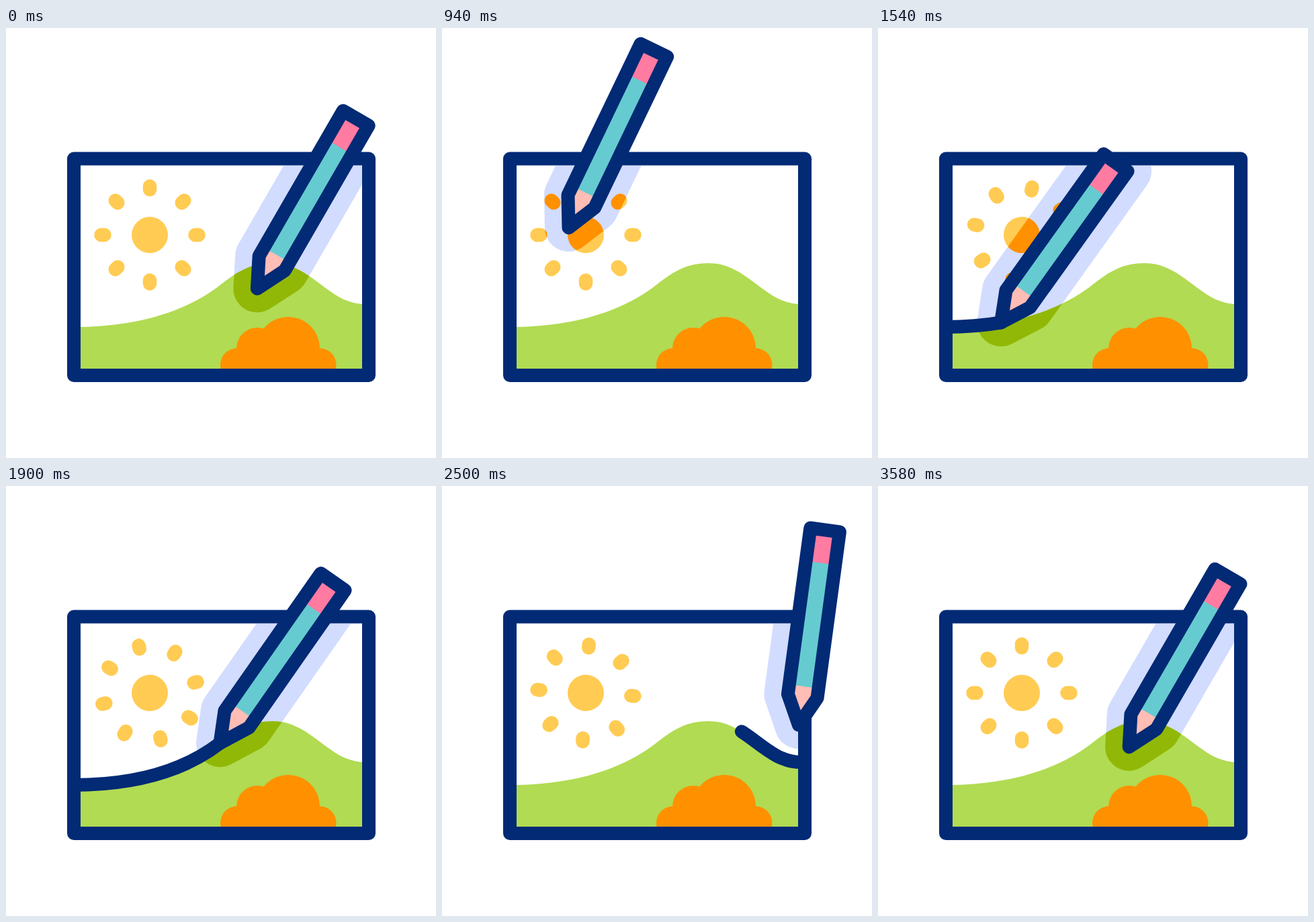
An HTML page that plays this animation: 640x640 px, repeating every 3.6 s.

```html
<!DOCTYPE html>
<html lang="en">
<head>
<meta charset="utf-8">
<title>Pencil drawing a landscape</title>
<style>
  html, body { margin: 0; height: 100%; overflow: hidden; background: #fff; }
  svg { display: block; width: 100vw; height: 100vh; }
</style>
</head>
<body>
<svg viewBox="0 0 640 640">
  <defs>
    <path id="ground"/>
    <g id="sun">
      <circle cx="214" cy="308" r="27" stroke="none"/>
      <path id="rays" stroke-width="20.5" stroke-linecap="round"/>
    </g>
    <path id="body" d="M0 0L-22 -43.5V-293H22V-43.5Z" stroke-linejoin="round"/>
    <clipPath id="inside"><path d="M111 205H530V507H111Z"/></clipPath>
    <mask id="halo" maskUnits="userSpaceOnUse" x="0" y="0" width="640" height="640">
      <use class="pencil" href="#body" fill="#fff" stroke="#fff" stroke-width="71"/>
    </mask>
  </defs>

  <g clip-path="url(#inside)">
    <use href="#ground" fill="#b1db52"/>
    <use href="#sun" fill="#ffcb52" stroke="#ffcb52"/>
    <g mask="url(#halo)">
      <path d="M0 0H640V640H0Z" fill="#d2dcff"/>
      <use href="#ground" fill="#91b806"/>
      <use href="#sun" fill="#ff9100" stroke="#ff9100"/>
    </g>
    <g fill="#ff9100">
      <circle cx="344" cy="501.500" r="25"/>
      <circle cx="374" cy="477" r="31"/>
      <circle cx="420" cy="477" r="47"/>
      <circle cx="466.500" cy="501.500" r="25"/>
      <path d="M344 477H467V507H344Z"/>
    </g>
  </g>

  <g fill="none" stroke="#022a75" stroke-width="20">
    <path id="hill" stroke-linecap="round"
      d="M101 445C200 445 272 420 322 380C347 361 365 350 397 350C455 350 480 411 534 411"/>
    <path d="M101 194.500H540V517H101Z" stroke-linejoin="round"/>
  </g>

  <g class="pencil">
    <use href="#body" fill="#66cbd0"/>
    <path d="M-22 -243.500V-293H22V-243.500Z" fill="#ff7ba1"/>
    <path d="M0 0L-22 -43.500V-58H22V-43.500Z" fill="#ffbdb5"/>
    <use href="#body" fill="none" stroke="#022a75" stroke-width="20"/>
  </g>
</svg>

<script>
const LOOP = 3600;
const $ = id => document.getElementById(id);
const hill = $('hill'), sun = $('sun');
const pencils = document.querySelectorAll('.pencil');
const length = hill.getTotalLength();

$('ground').setAttribute('d', hill.getAttribute('d') + 'H540V517H101Z');
$('rays').setAttribute('d', Array.from({ length: 8 }, (_, i) => {
  const at = r => `${214 + r * Math.cos(i * Math.PI / 4)} ${308 + r * Math.sin(i * Math.PI / 4)}`;
  return `M${at(67.5)}L${at(72.5)}`;
}).join(''));

// time, tip x, tip y, tilt in degrees
const poses = [
  [-40, 374, 388, 30], [0, 374, 388, 30], [380, 337, 323, 52.7], [550, 349, 246, 66],
  [850, 230, 273, 31], [940, 189, 297, 25.7], [1100, 103, 341, 18], [1210, 59, 405, 14],
  [1320, 101, 445, 24], [1540, 183, 440, 35.6], [1900, 317, 382, 35], [2160, 430, 357, 21],
  [2330, 534, 411, 14], [2500, 531, 356, 7.7], [2720, 487, 323, 10], [3000, 437, 332, 18],
  [3260, 400, 358, 26], [3570, 374, 388, 30], [3600, 374, 388, 30]
];
// time, distance along the hill
const heads = [[1320, 0], [1540, 82], [1900, 230], [2160, 353], [2330, length]];
const tails = [[2180, 0], [2350, 140], [2500, 368], [2600, length]];

// Cubic Hermite spline through keys, clamped at both ends
function spline(keys, t, col) {
  const last = keys.length - 1;
  if (t <= keys[0][0]) return keys[0][col];
  if (t >= keys[last][0]) return keys[last][col];
  const i = keys.findIndex(k => k[0] > t) - 1;
  const slope = j => {
    const a = keys[Math.max(j - 1, 0)], b = keys[Math.min(j + 1, last)];
    return (b[col] - a[col]) / (b[0] - a[0]);
  };
  const a = keys[i], b = keys[i + 1], d = b[0] - a[0], u = (t - a[0]) / d, v = 1 - u;
  return v * v * ((1 + 2 * u) * a[col] + u * d * slope(i))
       + u * u * ((1 + 2 * v) * b[col] - v * d * slope(i + 1));
}

function easeInOut(u, power) {
  u = Math.min(1, Math.max(0, u));
  return u < 0.5 ? (2 * u) ** power / 2 : 1 - (2 - 2 * u) ** power / 2;
}

function draw(t) {
  const head = spline(heads, t, 1), tail = spline(tails, t, 1);
  hill.style.display = head > tail ? '' : 'none';
  hill.setAttribute('stroke-dasharray', `${Math.max(0, head - tail)} 999`);
  hill.setAttribute('stroke-dashoffset', -tail);

  const drawing = t > 1320 && t < 2330;
  const tip = drawing ? hill.getPointAtLength(head)
                      : { x: spline(poses, t, 1), y: spline(poses, t, 2) };
  const place = `translate(${tip.x} ${tip.y}) rotate(${spline(poses, t, 3)})`;
  pencils.forEach(p => p.setAttribute('transform', place));

  const spin = -180 * easeInOut((t - 945) / 1800, 2.45);
  sun.setAttribute('transform', `rotate(${spin} 214 308)`);
}

function frame() {
  draw(performance.now() % LOOP);
  requestAnimationFrame(frame);
}
frame();
</script>
</body>
</html>
```
